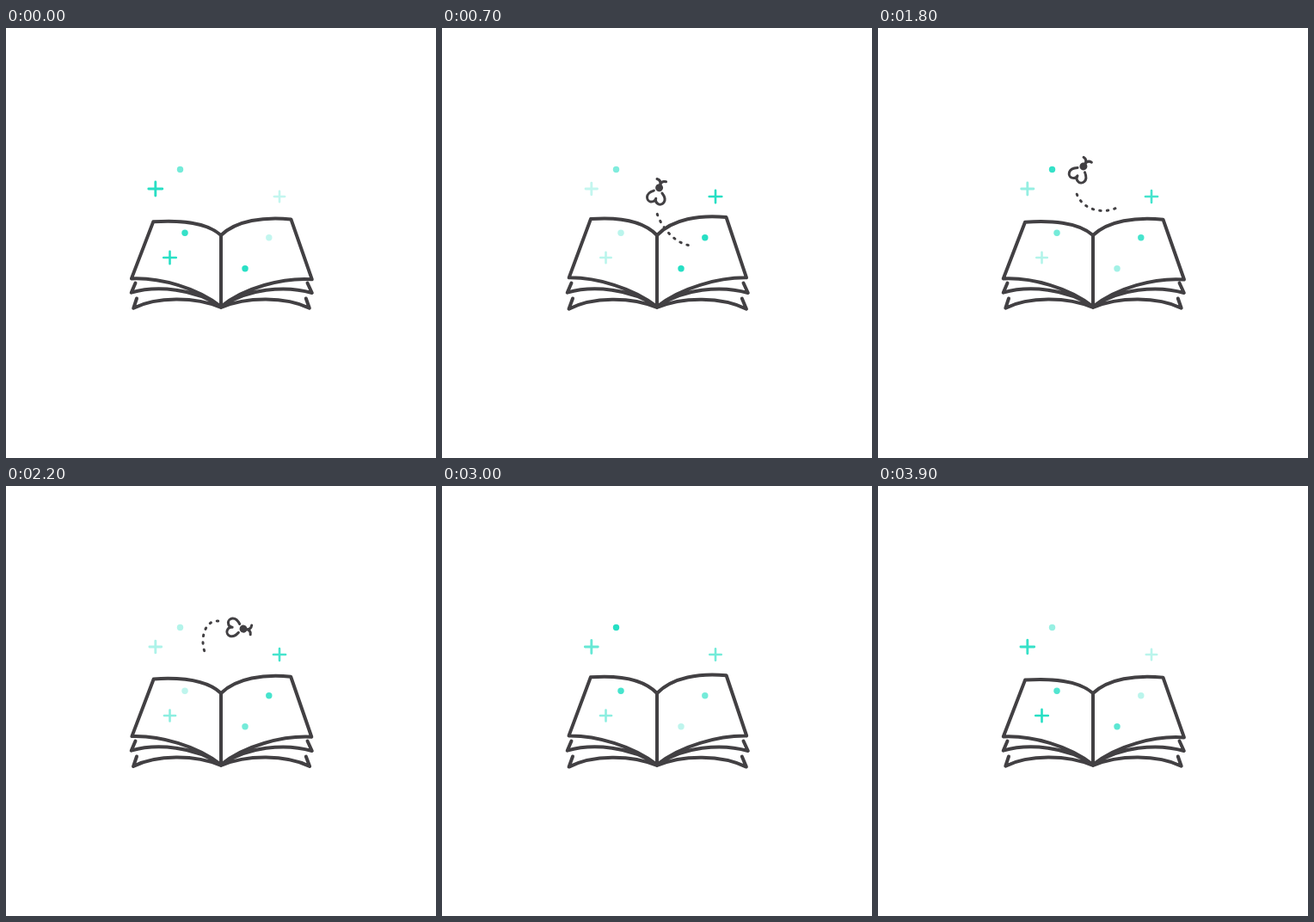
Write an HTML page that moves like this. It is 500 px wide and 500 px high and loops after 4 s.

```html
<!DOCTYPE html>
<html lang="en">
<head>
<meta charset="utf-8">
<title>Open book</title>
<style>
  html, body { margin: 0; width: 100%; height: 100%; overflow: hidden; background: #fff; }
  svg { display: block; width: 100vw; height: 100vh; }
  path { fill: none; stroke-linecap: round; stroke-linejoin: round; }
  #book, #bee, #trail { stroke: #424043; }
  #book { stroke-width: 4; }
  #bee, #trail { stroke-width: 3; }
  #trail { stroke-dasharray: 1.5 7.1; }
  #sparkles path { stroke: #26dfc4; }
</style>
</head>
<body>
<svg viewBox="0 0 500 500">
  <path id="book"/>
  <g id="sparkles"></g>
  <path id="route" d="M289 253C266 250 246 221 247 197A19 20 0 0 1 285 197C285 208 273 212.5 262 212.5
    C243 212.5 229 200 229 181C229 160 243 151 256 161C272 173 286 170 288 154L289 100"/>
  <path id="trail"/>
  <g id="bee">
    <circle r="3" fill="#424043"/>
    <path d="M0-3C0-7-2-9-5.5-9M0-3C0-7 2-9 5.5-9"/>
    <path d="M-5 5C-15 12-9 19-5 18.5C-2 18 0 16 0 13C0 16 2 18 5 18.5C9 19 15 12 5 5"/>
  </g>
</svg>
<script>
const LOOP = 4000, STEP = 100, TURN = 2 * Math.PI;
const $ = id => document.getElementById(id);
const clamp = (x, low = 0, high = 1) => Math.max(low, Math.min(high, x));

// Each sparkle pulses on a cosine; peak is the part of its cycle where it is brightest
const sparkles = [
  { x: 173.8, y: 187, arm: 8, peak: .03 },
  { x: 318, y: 196, arm: 7.3, peak: .5 },
  { x: 190.5, y: 267, arm: 7.3, peak: .95 },
  { x: 202.5, y: 164.5, peak: .25 },
  { x: 208, y: 238.3, peak: .1 },
  { x: 305.8, y: 243.8, peak: .5 },
  { x: 278, y: 279.8, peak: .05, cycles: 6 }
];
for (const s of sparkles) {
  s.node = document.createElementNS("http://www.w3.org/2000/svg", "path");
  s.node.setAttribute("stroke-width", s.arm ? s.arm / 2.8 : 7.4);
  $("sparkles").append(s.node);
}

function drawSparkle({ x, y, arm, peak, cycles = 3, node }, t) {
  const glow = .64 + .36 * Math.cos(TURN * (cycles * t / LOOP - peak));
  const r = arm * (.78 + .22 * glow);
  node.setAttribute("opacity", glow);
  node.setAttribute("d", arm ? `M${x - r} ${y}h${2 * r}M${x} ${y - r}v${2 * r}` : `M${x} ${y}h.01`);
}

// The pages breathe between a resting and a lifted pose
function drawBook(t) {
  const lift = (1 - Math.cos(TURN * (t - 1800) / 2000)) / 2;
  const pose = (rest, raised) => rest + (raised - rest) * lift;
  const low = pose(325.7, 326.7);
  $("book").setAttribute("d", `
    M250 324V241C232 ${pose(225, 222)} 200 ${pose(224, 220)} ${pose(171, 173)} ${pose(225.7, 222)}
    L${pose(145.7, 147.7)} ${pose(291.5, 290.3)}C179 290 222 302 250 324
    M250 241C268 ${pose(224, 222)} 300 ${pose(219.5, 217)} ${pose(331.5, 330.5)} ${pose(222.7, 220)}
    L${pose(356, 354)} ${pose(292.5, 290.3)}C322 290 277 302 250 324
    M150.5 296.5L145.7 307.7C175 299 220 303 250 324
    M350.5 296.5L355.8 308C325 299 280 303 250 324
    M152 314.5L${pose(148.3, 147.5)} ${low}C175 312.3 220 312.3 250 325
    M348.8 314.5L${pose(352.7, 354)} ${low}C325 312.3 280 312.3 250 325`);
}

// Key points [time, distance along the route] for the front of the trail
const flight = [[350, 0], [700, 61], [1200, 153], [1800, 215], [2600, 300], [2800, 310]];
const along = s => $("route").getPointAtLength(s);

function drawFlight(t) {
  let head = 0;
  for (let i = 1; i < flight.length; i++) {
    const [t0, s0] = flight[i - 1], [t1, s1] = flight[i];
    head += (s1 - s0) * clamp((t - t0) / (t1 - t0));
  }
  const tail = clamp(.137 * (t - 680), 0, 310);
  let d = "";
  for (let s = tail; s < head; s += 2) {
    const p = along(s);
    d += `${d ? "L" : "M"}${p.x} ${p.y}`;
  }
  $("trail").setAttribute("d", d);

  const p = along(head);
  const aim = ahead => {
    const q = along(head + ahead);
    return Math.atan2(q.y - p.y, q.x - p.x);
  };
  const course = aim(31), turn = aim(38) * 360 / TURN + 90;
  const x = p.x + 26 * Math.cos(course), y = p.y + 26 * Math.sin(course);
  $("bee").setAttribute("transform", `translate(${x} ${y}) rotate(${turn})`);
  $("bee").setAttribute("opacity", clamp((t - 250) / 150) * clamp((2900 - t) / 250));
}

const start = performance.now();
function tick() {
  const t = Math.floor((performance.now() - start) % LOOP / STEP) * STEP;
  drawBook(t);
  drawFlight(t);
  for (const s of sparkles) drawSparkle(s, t);
  requestAnimationFrame(tick);
}
tick();
</script>
</body>
</html>
```
